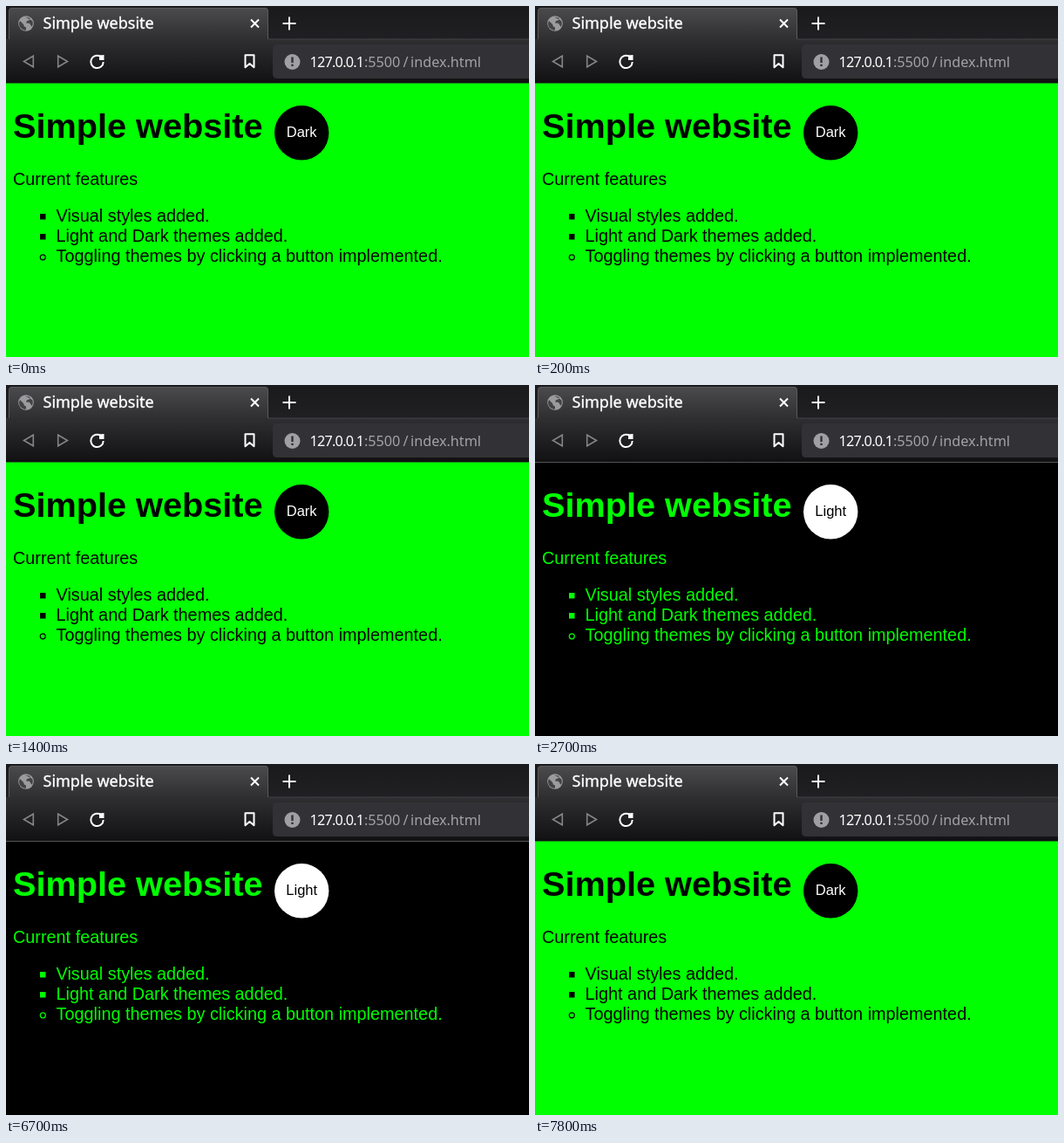
Recreate the animation shown at these times as an HTML page. Size 600 by 402 pixels, loop 9.6 s.

```html
<!DOCTYPE html>
<html lang="en">
<head>
<meta charset="utf-8">
<title>Simple website</title>
<style>
  html, body { margin: 0; width: 100%; height: 100%; overflow: hidden; background: #000; }
  svg { display: block; width: 600px; height: 402px; }

  .page {
    font-family: "Liberation Sans", Arial, sans-serif;
    font-size: 19.84px;
    fill: var(--ink);
    animation: theme 9.6s step-end infinite;
  }
  .bg { fill: var(--bg); }
  .edge { fill: var(--edge); }
  .title { font-size: 39.68px; font-weight: 700; }
  .ring { fill: none; stroke: var(--ink); stroke-width: 1.2; }
  .button { fill: var(--button); }
  .label { font-size: 16.53px; fill: var(--label); text-anchor: middle; }
  .to-dark { visibility: var(--to-dark); }
  .to-light { visibility: var(--to-light); }

  @keyframes theme {
    0%, 53.125%, 81.25%, 100% {
      --bg: #0f0; --ink: #000; --edge: #0f8f0f;
      --button: #000; --label: #fff;
      --to-dark: visible; --to-light: hidden;
    }
    28.125%, 69.7917% {
      --bg: #000; --ink: #0f0; --edge: #555456;
      --button: #fff; --label: #000;
      --to-dark: hidden; --to-light: visible;
    }
  }

  .chrome { font-family: "Noto Sans", "Open Sans", sans-serif; fill: #fff; }
  .line { fill: none; stroke: #fff; stroke-width: 2; }
  .tab-title { font-size: 18px; stroke: #fff; stroke-width: .35; }
  .url { font-size: 16.2px; fill: #a3a2a5; }
  .host { fill: #fff; letter-spacing: -.75px; }
</style>
</head>
<body>
<svg viewBox="0 0 600 402">
  <defs>
    <linearGradient id="strip" x2="0" y2="1">
      <stop stop-color="#1a191b"/><stop offset="1" stop-color="#201f22"/>
    </linearGradient>
    <linearGradient id="tab" x2="0" y2="1">
      <stop stop-color="#4b4a4d"/><stop offset="1" stop-color="#2f2e31"/>
    </linearGradient>
    <linearGradient id="bar" x2="0" y2="1">
      <stop stop-color="#2f2e31"/><stop offset="1" stop-color="#111012"/>
    </linearGradient>
  </defs>

  <g class="page">
    <rect class="bg" y="88" width="600" height="314"/>
    <rect class="edge" y="88" width="600" height="1"/>
    <text class="title" x="8" y="151">Simple website</text>
    <circle class="button" cx="339.2" cy="145.3" r="31.2"/>
    <text class="label to-dark" x="339.2" y="150.3">Dark</text>
    <text class="label to-light" x="339.2" y="150.3">Light</text>
    <text x="8" y="205">Current features</text>
    <rect x="39" y="238" width="6.5" height="6.5"/>
    <text x="57.6" y="247">Visual styles added.</text>
    <rect x="39" y="261" width="6.5" height="6.5"/>
    <text x="57.6" y="270">Light and Dark themes added.</text>
    <circle class="ring" cx="42.3" cy="287.8" r="3"/>
    <text x="57.6" y="293">Toggling themes by clicking a button implemented.</text>
  </g>

  <g class="chrome">
    <rect width="600" height="38" fill="url(#strip)"/>
    <rect y="38" width="600" height="50" fill="url(#bar)"/>
    <rect x="301" y="37.5" width="299" height="1" fill="#444346"/>
    <path d="M3 38V6q0-4 4-4H297q4 0 4 4V38z" fill="url(#tab)"/>
    <path d="M3.5 38V6q0-3.5 3.5-3.5H297q3.5 0 3.5 3.5V38" fill="none" stroke="#5a595c"/>

    <!-- globe -->
    <circle cx="23" cy="20" r="8.8" fill="#9b9a9d"/>
    <path d="M16 17l4 4 1 2.5 2 1v3l-2 .2q-6-2-6-8zM22 12.500l5.500 1.200-.5 2.500-3 1-1 2.300 4 .3 1.500 2.500 1.300 1.500q1.500-3 .7-6.300l-2-1.500" fill="#434245"/>

    <text class="tab-title" x="42.500" y="26">Simple website</text>
    <path class="line" d="M281 15.500l9 9m0-9l-9 9M317.500 20h15m-7.500-7.500v15"/>

    <path class="line" d="M31.300 57.200v12.600L20.500 63.500z" style="stroke:#858487;stroke-width:1.600"/>
    <path class="line" d="M59.700 57.200v12.600L70.500 63.500z" style="stroke:#858487;stroke-width:1.600"/>
    <path class="line" d="M108.500 57.900A7.200 7.200 0 1 0 111.700 64"/>
    <path d="M107 56.500l5.500-.5v6h-5.500z"/>
    <path class="line" d="M274.500 56.300h10v14l-5-4.300-5 4.300z" stroke-linejoin="round"/>

    <path d="M600 44H311q-5 0-5 5V78q0 5 5 5H600z" fill="#323135"/>
    <circle cx="328.500" cy="64" r="9" fill="#a09fa2"/>
    <path d="M327.300 58.500h2.400v6.500h-2.400zm0 8.200h2.400v2.400h-2.400z" fill="#323135"/>
    <text class="url" y="70"><tspan class="host" x="348.500">127.0.0.1</tspan><tspan x="411">:5500</tspan><tspan x="455.500">/</tspan><tspan x="464">index.html</tspan></text>
  </g>
</svg>
</body>
</html>
```
